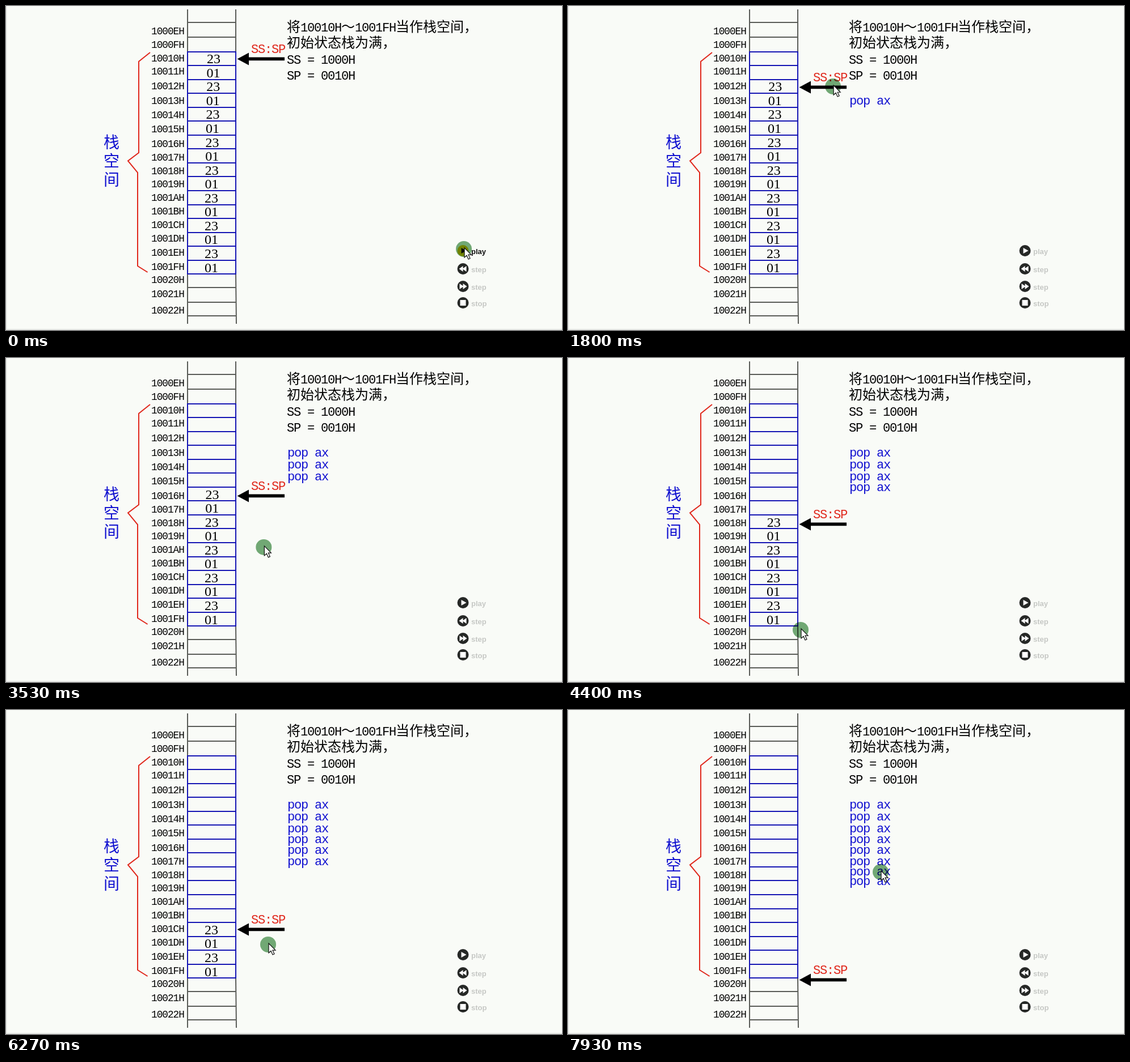
Recreate the animation shown at these times as an HTML page. Size 980 px wide and 572 px high, loop 8000 ms.

```html
<!DOCTYPE html>
<html lang="zh-CN">
<head>
<meta charset="utf-8">
<title>栈空间</title>
<style>
  html, body { margin: 0; width: 100%; height: 100%; overflow: hidden; background: #f9fbf7; }
  svg { display: block; }
  text { white-space: pre; }
  .mono { font: 22px "Liberation Mono", monospace; letter-spacing: -.0545em; }
  .label { font-size: 17.7px; }
  .han { font: 24px "Noto Sans CJK SC", "Noto Sans CJK", sans-serif; }
  .side { font-size: 28px; fill: #1010d0; text-anchor: middle; }
  .value { font: 24px "Liberation Serif", serif; text-anchor: middle; }
  .caption { font: bold 13px "Liberation Sans", sans-serif; fill: #c6c8c5; }
  .gray { stroke: #5a5c58; stroke-width: 2; }
  .blue { stroke: #1616b4; stroke-width: 2; }
  .glow { fill: #74ab78; mix-blend-mode: multiply; }
</style>
</head>
<body>
<svg id="stage" width="980" height="572" viewBox="0 0 980 572">
  <rect width="980" height="572" fill="#f9fbf7"/>
  <path d="M0 571H980M.5 0V572" stroke="#e6e8e5" stroke-width="2"/>
  <g id="memory"></g>
  <path d="M254 82L234 98V259L215 273.500L232 294V459L249.500 470" fill="none" stroke="#e0281c" stroke-width="2"/>
  <g id="notes"></g>
  <g id="pops"></g>
  <g id="pointer">
    <path d="M407.500 .5L428-10.500V-2.500H491V3.200H428V11.500Z"/>
    <text class="mono" x="432" y="-10" fill="#e0281c">SS:SP</text>
  </g>
  <g id="controls"></g>
  <g id="cursor">
    <circle class="glow" r="14"/>
    <path id="arrow" d="M1-2V15L5 11.300L8 18L11 16.700L8 10.200H13Z" fill="#fff" stroke="#111" stroke-width="1.200"/>
    <path id="hand" d="M-1 13V2Q-1 0 .7 0T2.500 2V8Q5 6 6 8.500Q8.500 7 9.300 9.500Q12 8.500 12 11V16L10 20V22.500H2V20L-4 13Q-4.500 10-2 11Z"
      fill="#fff" stroke="#111" stroke-width="1.300"/>
  </g>
</svg>
<script>
const LOOP = 8000, FIRST_POP = 1350, POP_GAP = 930;
const CELLS = 16, TOP = 80.5, CELL_H = 24.55;
const labelY = [44, 68, 92, 115, 141, 167, 192, 217, 243, 267, 291,
  314, 338, 362, 386, 410, 435, 460, 483, 508, 537];
const pointerY = [93, 143, 194, 243, 293, 338, 387, 435, 476];
const popY = [168, 189, 210, 229, 248, 268, 286, 303];
// time, x, y
const route = [
  [0, 807, 429], [100, 807, 429], [850, 429, 117], [1200, 429, 117],
  [2400, 505, 167], [2800, 505, 167], [4200, 410, 480], [4500, 410, 480],
  [5600, 321, 384], [6270, 462, 414], [6450, 462, 414], [7700, 551, 286], [LOOP, 551, 286]
];

const $ = id => document.getElementById(id);
function add(parent, tag, attrs, content = '') {
  const el = document.createElementNS('http://www.w3.org/2000/svg', tag);
  for (const key in attrs) el.setAttribute(key, attrs[key]);
  el.innerHTML = content;
  parent.appendChild(el);
  return el;
}
const line = (cls, x1, y1, x2, y2) => add($('memory'), 'line', { class: cls, x1, y1, x2, y2 });
const show = (el, on) => { el.style.display = on ? '' : 'none'; };

// Memory column
for (const x of [320, 405]) {
  line('gray', x, 6, x, 80);
  line('gray', x, 473, x === 405 ? 406 : x, 561);
  line('blue', x, 80, x, 474);
}
for (const y of [29, 55, 497, 523, 547]) line('gray', 320, y, 405, y);
for (let i = 0; i <= CELLS; i++) {
  const y = Math.round(TOP + i * CELL_H);
  line('blue', 319, y, 406, y);
}

labelY.forEach((y, i) => {
  const address = (0x1000E + i).toString(16).toUpperCase() + 'H';
  add($('memory'), 'text', { class: 'mono label', x: 256, y: y + 6 }, address);
});
const values = Array.from({ length: CELLS }, (_, i) => add($('memory'), 'text', {
  class: 'value', x: 366 - .4 * Math.min(i, 10), y: TOP + (i + .5) * CELL_H + 8.5
}, i % 2 ? '01' : '23'));

// Notes
const latin = s => `<tspan class="mono">${s}</tspan>`;
[...'栈空间'].forEach((c, i) => add($('notes'), 'text', { class: 'han side', x: 186, y: 251 + 33 * i }, c));
[
  `将${latin('10010H')}～${latin('1001FH')}当作栈空间，`,
  '初始状态栈为满，',
  latin('SS = 1000H'),
  latin('SP = 0010H')
].forEach((s, i) => add($('notes'), 'text', { class: 'han', x: 495, y: 44.5 + 28.5 * i }, s));
const pops = popY.map(y => add($('pops'), 'text', { class: 'mono', x: 496, y: y + 6, fill: '#1010d0' }, 'pop ax'));

// Player buttons
const buttons = [
  ['play', 432, 'M-3-5L6 0L-3 5Z'],
  ['step', 464, 'M0-5V5L-7 0ZM6-5V5L-1 0Z'],
  ['step', 495, 'M0-5V5L7 0ZM-6-5V5L1 0Z'],
  ['stop', 524, 'M-5-5H5V5H-5Z']
].map(([name, y, icon]) => {
  const g = add($('controls'), 'g', { transform: `translate(805.5 ${y})` });
  return {
    disc: add(g, 'circle', { r: 10, fill: '#262826' }),
    icon: add(g, 'path', { d: icon, fill: '#fff' }),
    caption: add(g, 'text', { class: 'caption', x: 14.5, y: 6 }, name)
  };
});

function cursorAt(t) {
  const i = Math.max(1, route.findIndex(p => p[0] > t));
  const [t0, x0, y0] = route[i - 1], [t1, x1, y1] = route[i];
  const u = (t - t0) / (t1 - t0), k = u * u * (3 - 2 * u);
  return [x0 + (x1 - x0) * k, y0 + (y1 - y0) * k];
}

function draw(now) {
  const t = now % LOOP;
  const done = Math.max(0, Math.min(8, Math.floor((t - FIRST_POP) / POP_GAP) + 1));
  values.forEach((el, i) => show(el, i >= done * 2));
  pops.forEach((el, i) => show(el, i < done));
  $('pointer').setAttribute('transform', `translate(0 ${pointerY[done]})`);

  const [x, y] = cursorAt(t);
  $('cursor').setAttribute('transform', `translate(${x} ${y})`);
  const overLink = t > 800 && t < 1300;
  show($('hand'), overLink);
  show($('arrow'), !overLink);

  const hover = Math.hypot(x - 805, y - 432) < 12;
  const { disc, icon, caption } = buttons[0];
  disc.style.fill = hover ? '#f8c400' : '';
  icon.style.fill = hover ? '#111' : '';
  caption.style.fill = hover ? '#111' : '';
}

const start = performance.now();
(function tick() {
  draw(performance.now() - start);
  requestAnimationFrame(tick);
})();
</script>
</body>
</html>
```
